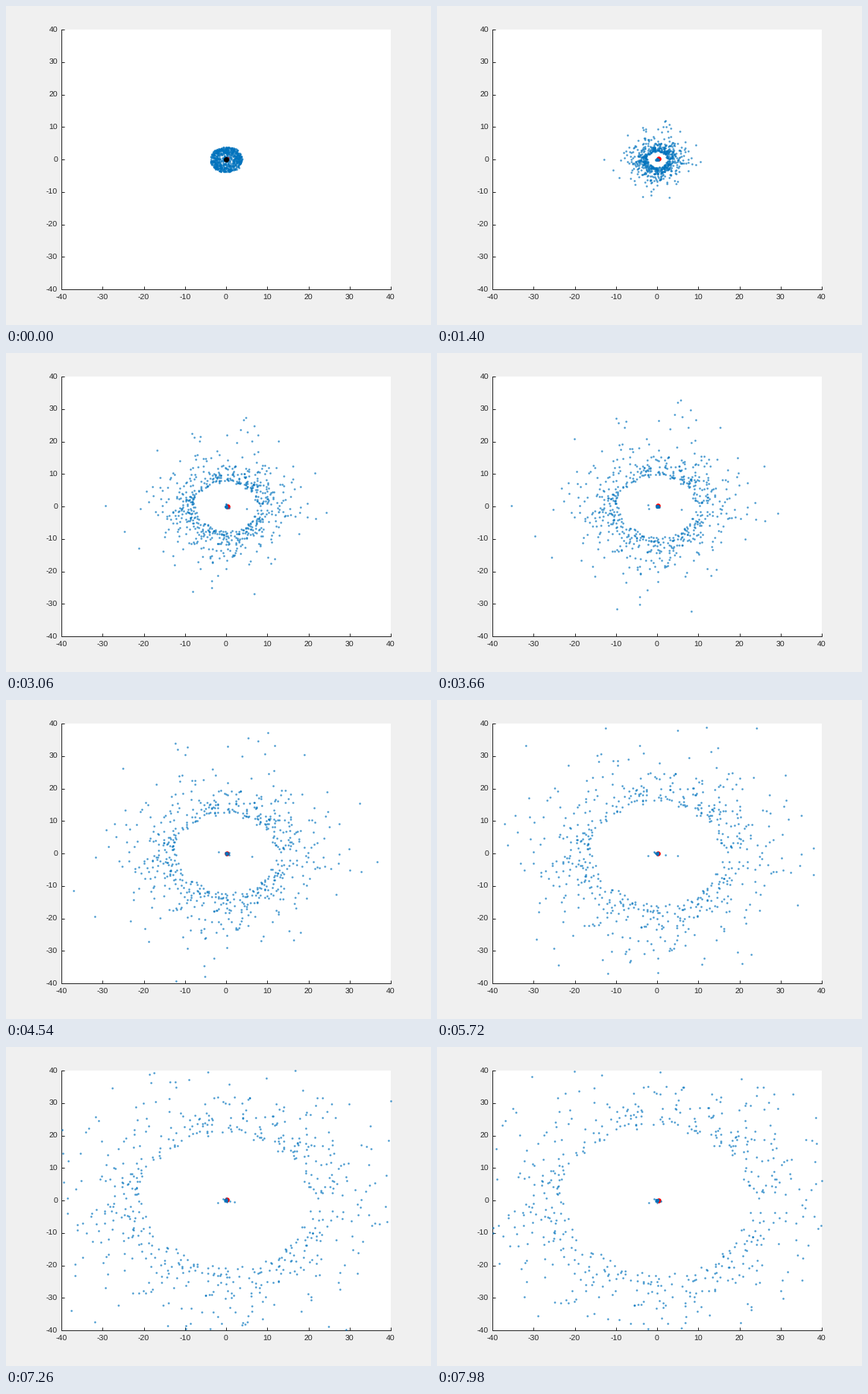
Recreate the animation shown at these times as a matplotlib script. Size 560 px wide and 420 px high, loop 8 s.

```python
import numpy as np
import matplotlib.pyplot as plt
from matplotlib.animation import FuncAnimation

plt.rcParams["font.family"] = "Liberation Sans"
plt.rcParams["text.hinting"] = "none"

W, H, DPI = 560, 420, 100
FRAMES, STEP = 400, 20
BLUE, INK = "#0072bd", "#262626"
PX = 72 / DPI
LIMIT = 40
R_MIN, R_MAX = 1.15, 4.0

rng = np.random.default_rng(12)


def directions(n):
    a = rng.uniform(0, 2 * np.pi, n)
    return np.c_[np.cos(a), np.sin(a)]


# Cloud that falls through the centre and escapes on the other side;
# inner particles arrive sooner and leave faster.
N = 620
r0 = np.sqrt(R_MIN**2 + (R_MAX**2 - R_MIN**2) * rng.beta(1.5, 1.4, N))
heading = directions(N)
fall = 0.62 * (r0 / R_MAX) ** 1.5
speed = 12 / r0 * rng.normal(1, 0.02, N)

# Particles that stay bound to the centre.
M = 36
core_r0 = R_MIN * np.sqrt(rng.uniform(0, 1, M))
core_dir = directions(M)
core_amp = rng.exponential(0.4, M)
core_freq = rng.uniform(3, 9, M)


def escaping(t):
    inward = -r0 * (1 - np.minimum(t / fall, 1) ** 2) ** (2 / 3)
    outward = speed * np.maximum(t - fall, 0)
    return heading * (inward + outward)[:, None]


def bound(t):
    amp = core_amp + (core_r0 - core_amp) * np.exp(-t / 0.3)
    return core_dir * (amp * np.cos(core_freq * t))[:, None]


def straggler(t):
    x = max(0, 6.2 - 0.65 * (t - 4.4) ** 2)
    return np.array([[x, -0.16 * x]])


fig = plt.figure(figsize=(W / DPI, H / DPI), dpi=DPI, facecolor="#f0f0f0")
ax = fig.add_axes([73 / W, 47 / H, 434 / W, 342 / H])
ax.set(xlim=(-LIMIT, LIMIT), ylim=(-LIMIT, LIMIT))
ticks = range(-LIMIT, LIMIT + 1, 10)
labels = [str(v) for v in ticks]
ax.set_xticks(ticks, labels)
ax.set_yticks(ticks, labels)
ax.tick_params(direction="in", length=4.3 * PX, width=PX, color=INK,
               labelcolor=INK, labelsize=10.5 * PX)
ax.tick_params(axis="x", pad=6.5 * PX)
ax.tick_params(axis="y", pad=5 * PX)
ax.spines[["top", "right"]].set_visible(False)
ax.spines[["left", "bottom"]].set(linewidth=PX, color=INK)


def dots(color, size, z, alpha=1):
    return ax.plot([], [], "o", color=color, ms=size * PX, mew=0,
                   alpha=alpha, zorder=z, clip_on=False)[0]


red = dots("red", 6.5, 3)
blue = dots(BLUE, 2.6, 4, 0.72)
black = dots("black", 7, 5)
black.set_data([0], [0])


def draw(i):
    t = i * STEP / 1000
    pts = np.vstack([escaping(t), bound(t), straggler(t)])
    blue.set_data(*pts[np.abs(pts).max(axis=1) <= LIMIT].T)
    red.set_data([0.25 + 0.1 * np.sin(5 * t)], [0.15 + 0.1 * np.cos(5 * t)])
    black.set_visible(i == 0)
    return red, blue, black


anim = FuncAnimation(fig, draw, frames=FRAMES, interval=STEP, repeat=True,
                     repeat_delay=0, blit=False)
plt.show()
```
